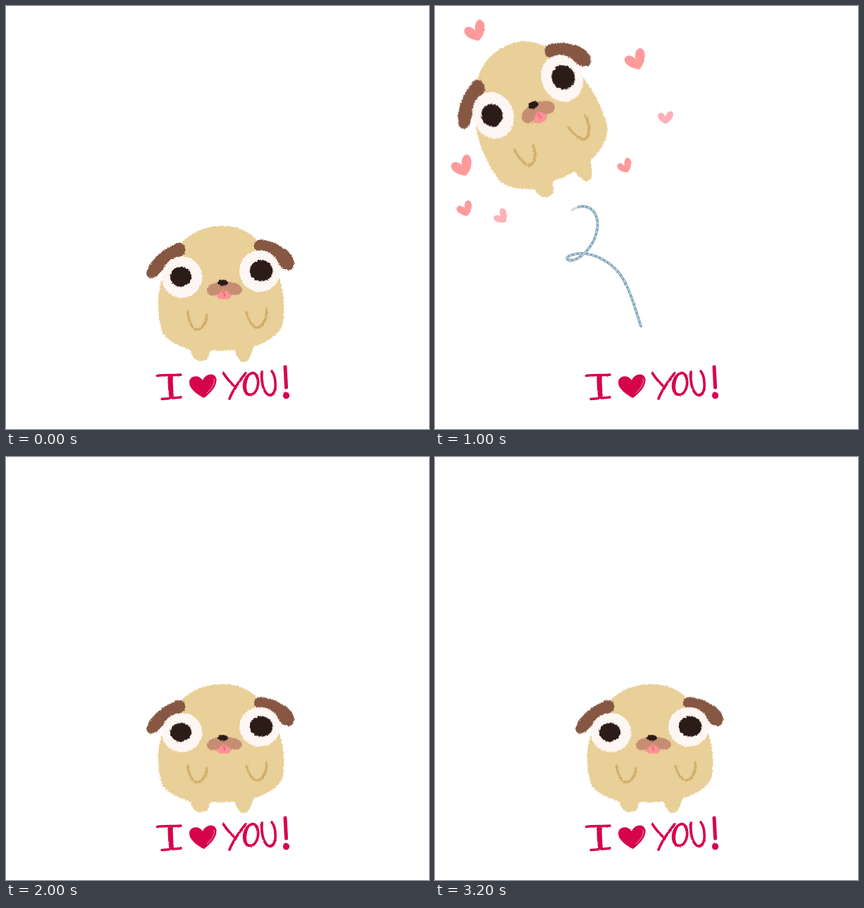
Write an HTML page that moves like this. It is 600x600 px and loops after 3400 ms.

```html
<!DOCTYPE html>
<html lang="en">
<head>
<meta charset="utf-8">
<title>I love you!</title>
<style>
  html, body { margin: 0; width: 100%; height: 100%; overflow: hidden; background: #fff; }
  svg { display: block; width: 100%; height: 100%; }

  :root {
    --tall: translate(0px, 0px);
    --squash: translate(0px, 505px) scale(1, .948) translate(0px, -505px);
    --left: translate(82.500px, 155px) rotate(-23.200deg) scale(1, 1.150) translate(-249.500px, -384.500px);
    --right: translate(421px, 127.500px) rotate(25.300deg) scale(1, 1.150) translate(-249.500px, -384.500px);
  }

  #pug, .leap, .love { animation: 3400ms step-end infinite; }
  #pug { animation-name: hop; transform-origin: 0 0; }
  .leap, .love { visibility: hidden; }
  #leapL { animation-name: leapL; }
  #leapR { animation-name: leapR; }
  #loveL { animation-name: loveL; }
  #loveR { animation-name: loveR; }

  @keyframes hop {
    0%, 8.823%, 17.647% { transform: var(--tall); }
    5.882%, 14.705%, 23.529% { transform: var(--squash); }
    29.411% { transform: var(--left); }
    50%, 58.823%, 67.647% { transform: var(--squash); }
    55.882%, 64.705% { transform: var(--tall); }
    73.529% { transform: var(--right); }
    94.117%, 100% { transform: var(--squash); }
  }
  @keyframes leapL {
    0%, 50%, 100% { visibility: hidden; }
    29.411% { visibility: visible; }
  }
  @keyframes leapR {
    0%, 94.117%, 100% { visibility: hidden; }
    73.529% { visibility: visible; }
  }
  @keyframes loveL {
    0%, 35.294%, 41.176%, 47.058%, 100% { visibility: hidden; }
    29.411%, 38.235%, 44.117% { visibility: visible; }
  }
  @keyframes loveR {
    0%, 79.411%, 85.294%, 91.176%, 100% { visibility: hidden; }
    73.529%, 82.352%, 88.235% { visibility: visible; }
  }

  .line { fill: none; stroke-linecap: round; stroke-linejoin: round; }
  .arm { stroke: #d1ad68; stroke-width: 3.3; }
  .ink { stroke: #d6044b; stroke-width: 3.6; }
  .thin { stroke-width: 2.2; }
  .bold { stroke-width: 5; }
  .trail { stroke: #83a5b9; stroke-width: 3.7; }
  .glint { stroke: #d0e2eb; stroke-width: 1.4; stroke-dasharray: 3.5 3; stroke-linecap: butt; }
</style>
</head>
<body>
<svg viewBox="0 0 600 600" role="img" aria-label="A pug hops with love: I love you!">
  <defs>
    <filter id="chalk" x="-10%" y="-10%" width="120%" height="120%" color-interpolation-filters="sRGB">
      <feTurbulence type="fractalNoise" baseFrequency=".42" numOctaves="2" seed="4"/>
      <feDisplacementMap in="SourceGraphic" scale="4" xChannelSelector="R" yChannelSelector="G"/>
    </filter>
    <filter id="pen" x="-10%" y="-10%" width="120%" height="120%" color-interpolation-filters="sRGB">
      <feTurbulence type="fractalNoise" baseFrequency=".3" numOctaves="2" seed="9"/>
      <feDisplacementMap in="SourceGraphic" scale="2" xChannelSelector="R" yChannelSelector="G"/>
    </filter>

    <path id="heart" d="M0 14C-8 10-15.500 4-15.500-4C-15-10-7-11-4-7C-2-5-1-3 0-1C0-6 4-14 10-14C16-13 16-5 13 1C10 7 5 12 0 14Z"/>
    <path id="curl" d="M204 285C211 283 219 285 224 290C236 305 231 330 214 349C206 357 196 363 189 360C183 357 192 352 205 351C225 350 248 362 262 380C276 398 284 430 292 454"/>

    <g id="swoosh" filter="url(#pen)">
      <path class="line trail" opacity=".4" d="M195 289Q199 286 204 285"/>
      <use href="#curl" class="line trail"/>
      <use href="#curl" class="line glint"/>
    </g>

    <g id="hearts" fill="#ff9a9b" filter="url(#pen)">
      <use href="#heart" transform="translate(57.500 36) rotate(-18)"/>
      <use href="#heart" transform="translate(285 76.500) rotate(-20)"/>
      <use href="#heart" transform="translate(39 227.500) rotate(-20)"/>
      <use href="#heart" transform="translate(269.500 227) rotate(-22) scale(.7)"/>
      <use href="#heart" transform="translate(42.500 288) rotate(-18) scale(.74)"/>
      <g fill="#ffb0b8">
        <use href="#heart" transform="translate(327 158) rotate(3) scale(.72 .66)"/>
        <use href="#heart" transform="translate(94 299) rotate(-36) scale(.68)"/>
      </g>
    </g>
  </defs>

  <g class="leap" id="leapL"><use href="#swoosh"/></g>
  <g class="leap" id="leapR"><use href="#swoosh" transform="translate(616 0) scale(-1 1)"/></g>
  <g class="love" id="loveL"><use href="#hearts"/></g>
  <g class="love" id="loveR"><use href="#hearts" transform="translate(613 10.500) scale(-1 1)"/></g>

  <g id="pug">
    <g filter="url(#chalk)">
      <!-- body -->
      <path fill="#e9cf98" d="M306 312C282 312 262 322 250 335C234 354 221 381 217 405C215 420 216 440 220 458C225 473 243 482 262 488C264 498 269 504 277 504C285 503 289 497 290 488Q308 490 325 488C327 498 331 505 338 505C345 504 348 494 351 483C368 478 386 468 392 453C396 440 394 412 391 397C386 376 372 350 354 330C341 317 325 312 306 312Z"/>
      <!-- ears -->
      <g fill="#865742">
        <path d="M246 336C252 336 255 342 254 348C253 354 248 356 240 360C229 366 222 374 217 380C213 386 206 387 201 384C196 379 203 366 212 357C222 347 237 337 246 336Z"/>
        <path d="M353 345C350 338 353 332 361 331C374 332 392 340 402 350C409 357 411 367 406 373C400 377 393 373 387 367C377 358 361 352 353 345Z"/>
      </g>
      <!-- eyes -->
      <g fill="#fef6f3">
        <ellipse cx="249.500" cy="384.500" rx="28.800" ry="29.500"/>
        <ellipse cx="360" cy="376" rx="29" ry="29.500"/>
      </g>
      <g fill="#2c1c18">
        <ellipse cx="248" cy="384" rx="15" ry="14"/>
        <ellipse cx="362" cy="375.500" rx="16.300" ry="15"/>
      </g>
      <!-- muzzle -->
      <path fill="#c68d72" d="M285 404C284 396 296 391 309 391C323 391 335 395 335 403C334 410 326 411 319 409C315 407 312 405 309 403C306 406 302 410 295 411C289 411 285 409 285 404Z"/>
      <path fill="#ff9197" d="M298 411C304 407 306 402 310 402C314 404 316 408 320 409C320 414 314 417 308 416C303 416 300 414 298 411Z"/>
      <path class="line" stroke="#e8717b" stroke-width="2.400" d="M309 405L310 410"/>
      <ellipse cx="307.500" cy="392.500" rx="7.400" ry="4.400" fill="#291a15"/>
      <!-- arms -->
      <path class="line arm" d="M258 434C259 447 264 459 271 459C279 458 284 449 285 438"/>
      <path class="line arm" d="M341 434C344 447 350 456 357 456C365 455 371 442 369 429"/>
    </g>
  </g>

  <!-- lettering -->
  <g filter="url(#pen)">
    <g class="line ink">
      <path d="M214.500 524.500C225 523 237 524 248 523M221 557.500C231 557 240 555.500 248 555"/>
      <path d="M231.500 526C231 538 232 547 233.500 556M235 526C234.500 538 236 547 236 555"/>
      <path d="M308.500 521C313 528 319 535 326 541"/>
      <path d="M339 522C330 533 322 545 317 557"/>
      <path class="thin" d="M340 520L325 541"/>
      <path d="M350 520.500C341 522 336 534 338 543C340 553 350 554 355 545C360 535 358 520 349 520.500"/>
      <path class="thin" d="M346 522C339 530 338 546 344 552M354 524C359 532 358 545 351 551"/>
      <path d="M363 519C362 531 364 545 371 551C379 555 383 545 382 535C382 528 380 522 377 518"/>
      <path class="thin" d="M361.500 521C362 537 366 549 375 553"/>
      <path class="bold" d="M396 512L397.500 541"/>
    </g>
    <g fill="#d6044b">
      <path d="M279 531C283 521 297 519 298.500 530C299 541 288 550 281 556C271 551 260 543 260 534C260 524 274 522 279 531Z"/>
      <ellipse cx="397.500" cy="552.500" rx="4.600" ry="4.800"/>
    </g>
    <path class="line" stroke="#f0a3ba" stroke-width=".9" d="M295 529C297 536 291 543 285 549"/>
  </g>
</svg>
</body>
</html>
```
